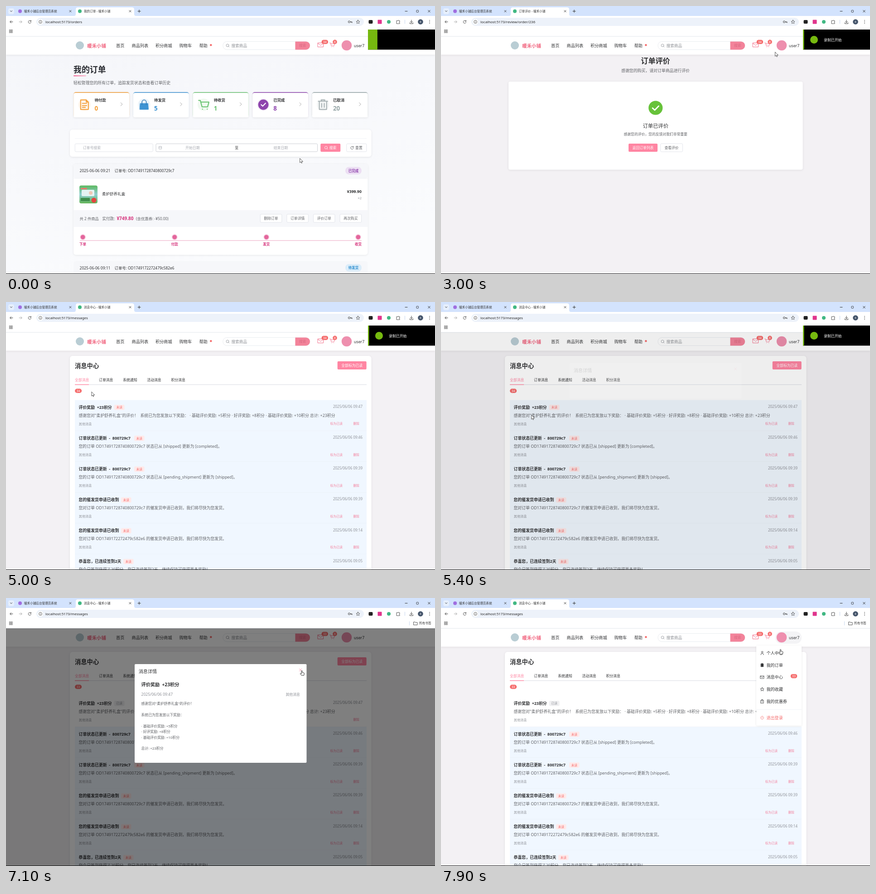
These frames come from a looping animation (947x592 px, 8000 ms). An HTML page:

```html
<!DOCTYPE html>
<html lang="zh-CN">
<meta charset="utf-8">
<style>
html, body { margin: 0; width: 100%; height: 100%; overflow: hidden; background: #f3f1f4 }
svg { display: block; width: 947px; height: 592px; font-family: "Noto Sans", "Noto Sans CJK SC", "Noto Sans CJK", sans-serif }
text { white-space: pre }
</style>
<svg id="stage" viewBox="0 0 947 592"></svg>
<script>
const PINK = '#ff85a2', RED = '#f56c6c', GREY = '#909399', INK = '#303133', LINE = '#dcdfe6';
const SHOP = '暖禾小铺', ITEM = '柔护舒养礼盒', ORDER = 'OD17491728740800729c7';

// y is the optical middle of the line of text
const text = (s, x, y, size, fill = INK, weight = 400, anchor = 'start', attr = '') =>
  `<text x="${x}" y="${y + size * .37}" font-size="${size}" fill="${fill}" font-weight="${weight}" text-anchor="${anchor}" ${attr}>${s}</text>`;
const mid = (s, x, y, size, fill, weight) => text(s, x, y, size, fill, weight, 'middle');
const end = (s, x, y, size, fill, weight) => text(s, x, y, size, fill, weight, 'end');
const rect = (x, y, w, h, fill, r = 0, attr = '') =>
  `<rect x="${x}" y="${y}" width="${w}" height="${h}" rx="${r}" fill="${fill}" ${attr}/>`;
const frame = (x, y, w, h, r = 2, color = LINE, fill = '#fff') => rect(x, y, w, h, fill, r, `stroke="${color}" stroke-width=".8"`);
const dot = (x, y, r, fill, attr = '') => `<circle cx="${x}" cy="${y}" r="${r}" fill="${fill}" ${attr}/>`;
const line = (d, color = '#444', w = 1, fill = 'none', attr = '') =>
  `<path d="${d}" stroke="${color}" stroke-width="${w}" fill="${fill}" stroke-linecap="round" stroke-linejoin="round" ${attr}/>`;
const at = (x, y, body, scale = 1) => `<g transform="translate(${x} ${y}) scale(${scale})">${body}</g>`;
const group = (id, body) => `<g id="${id}">${body}</g>`;
const lens = (x, y, color) => at(x, y, line('M3 0A3 3 0 1 1-3 0A3 3 0 1 1 3 0M2.2 2.2L3.8 3.8', color, .8));
const cross = (x, y, r, color, w) => at(x, y, line(`M${-r} ${-r}L${r} ${r}M${r} ${-r}L${-r} ${r}`, color, w));
const envelope = (x, y, color, w, scale) => at(x, y, line('M-6-4.5H6V4.5H-6ZM-6-3.5L0 1L6-3.5', color, w), scale);
const cart = (x, y, color, w, scale) =>
  at(x, y, line('M-6-5H-4L-2 2.5H4.5L6-3H-3.4M-1.5 5.2h.1M4 5.2h.1', color, w), scale);
const reload = (x, y, color) => at(x, y, line('M2.6-1.6A3.1 3.1 0 1 0 3.1.6M3-3.4V-1.3H.9', color, .9));
const button = (s, x, y, w, solid) =>
  (solid ? rect(x, y, w, 18, PINK, 2) : frame(x, y, w, 18)) + mid(s, x + w / 2, y + 9, 7.8, solid ? '#fff' : '#606266');
const badge = (x, y, w = 14.5) => rect(x - w / 2, y - 4.7, w, 9.4, RED, 4.7) + text('34', x, y, 6.8, '#fff', 400, 'middle', 'class="unreadCount"');

function chrome() {
  const tab = (x, color, s, id) => dot(x, 11.5, 4, color) + text(s, x + 9, 11.7, 6.6, '#333', 400, 'start', id);
  return rect(0, 0, 947, 22, '#d3e3fd') + rect(0, 22, 947, 45, '#fff') + rect(5, 5, 13, 13, '#e6effd', 4)
    + line('M9.5 10.5L11.5 12.5L13.5 10.5', '#333')
    + line('M150 22Q154 22 154 18V8Q154 3 159 3H278Q283 3 283 8V18Q283 22 287 22Z', 'none', 0, '#fff')
    + tab(31, '#a06ee0', SHOP + '后台管理员系统') + tab(163, '#41b883', '', 'id="tabTitle"')
    + cross(142, 11.5, 2, '#333', .9) + cross(274, 11.5, 2, '#333', .9)
    + line('M291 11.5H297M294 8.5V14.5M881 11.5H886', '#333') + frame(906, 9.3, 4.5, 4.5, 1, '#222', 'none') + cross(934, 11.5, 2.3, '#222', .9)
    + line('M15 35H9M11.5 32.2L8.8 35L11.5 37.8', '#444') + line('M29 35H35M32.5 32.2L35.2 35L32.5 37.8', '#aaa')
    + reload(52.3, 35, '#444') + rect(67, 26, 723, 18, '#edf2fa', 9)
    + dot(76, 35, 6, '#fff') + dot(76, 35, 3.4, 'none', 'stroke="#444" stroke-width=".8"') + line('M76 34.8V36.6M76 33.3v.1', '#444', .8)
    + text('', 87, 35, 7.95, '#222', 400, 'start', 'id="url"')
    + dot(757.5, 35, 2.1, 'none', 'stroke="#444"') + line('M760 35H764V37M762 35V36.5', '#444')
    + at(777, 35, line('M0-4L1.2-1.3L4-1L1.9.9L2.5 3.7L0 2.2L-2.5 3.7L-1.9.9L-4-1L-1.2-1.3Z', '#444', .8))
    + rect(800.5, 31, 9, 8, '#222', 2) + rect(820.5, 30.5, 9, 9, '#e0348c', 1) + dot(845, 35, 4, '#41b883')
    + line('M862.5 32.5H865Q866 29.5 867 32.5H869V35Q866.5 36 869 37V39H862.5Z', '#444', .9) + line('M880.5 31V39', '#c9d8ee')
    + line('M895 31V36.5M892.5 34.3L895 36.7L897.5 34.3M891.5 37V39H898.5V37', '#444')
    + dot(915, 35, 5.8, '#44546a') + mid('8', 915, 35, 6, '#fff') + [31.7, 35, 38.3].map(y => dot(935, y, .8, '#333')).join('')
    + [8, 12].map(x => [53, 57].map(y => frame(x - .5, y - .5, 2.7, 2.7, .4, '#444')).join('')).join('')
    + line('M890.5 52V60', '#c9d8ee') + line('M900 53H903L904 54H908V59.5H900Z', '#444', .9) + text('所有书签', 912, 56, 6.7, '#333')
    + rect(0, 66.6, 947, .8, '#dfe3ea');
}

function header() {
  const nav = [['首页', 243], ['商品列表', 277.6], ['积分商城', 330], ['购物车', 382.7], ['帮助', 426.7]];
  return rect(0, 67.4, 947, 40, '#fff', 0, 'filter="url(#soft)"') + dot(163, 87, 9, '#b9cdd4')
    + text(SHOP, 179.3, 88, 10.4, '#f1657f', 700) + nav.map(([s, x]) => text(s, x, 87.6, 9.15)).join('')
    + dot(452.3, 86.3, 2.2, RED) + frame(478.8, 78.4, 192, 18, 9, '#e4e7ed')
    + line('M638.5 78.4H662A9 9 0 0 1 662 96.4H638.5Z', 'none', 0, '#f3839a') + mid('搜索', 654.7, 87.6, 7.8, '#d96a82')
    + lens(489, 87, GREY) + text('搜索商品', 497.6, 87.6, 8.6, '#8d9095')
    + envelope(694.5, 86, '#f3718c', 1) + badge(703.8, 79.4) + cart(720, 86, '#f3718c', 1, .9)
    + dot(726, 79.4, 4.8, RED) + mid('8', 726, 79.4, 6.8, '#fff')
    + rect(738, 74, 58, 27, '#f4f4f6', 13, 'id="userHover"') + dot(752, 87, 11.2, '#ee8fae') + text('user7', 768, 87.6, 8.8);
}

function orders() {
  const icons = [
    line('M-9-11H4L9-6V11H-9ZM4-11V-6H9M-5-3H5M-5 2H5M-5 6H2', '#f39c33', 2),
    line('M-9-3H9L10 11H-10Z', '#3d93d3', 1, '#3d93d3') + line('M-5 0V-6A5 5 0 0 1 5-6V0', '#2f78b5', 1.6),
    cart(0, 0, '#67c26f', 1.1, 2),
    dot(0, 0, 12, '#8e44ad') + line('M-5 0L-1.5 3.5L5-3.5', '#fff', 2.2),
    line('M-11-8H11M-8.5-8V11H8.5V-8M-4-8V-11H4V-8M-3-3V6M3-3V6', '#a3adb0', 2)];
  const stats = [['待付款', 0, '#f39c33'], ['待发货', 5, '#3d93d3'], ['待收货', 1, '#67c26f'], ['已完成', 8, '#8e44ad'], ['已取消', 20, '#95a5a6']];
  const stat = ([label, n, color], i) => at(149.3 + i * 131.6, 190,
    rect(0, 0, 123, 56, color, 5, 'opacity=".75"') + rect(0, 2, 123, 54, '#fff', 4, 'filter="url(#soft)"')
    + dot(24, 28, 13.5, color, 'opacity=".1"') + at(24, 28, icons[i], .95)
    + text(label, 46.2, 17.6, 8.4, INK, 600) + text(n, 46.2, 36, 13.4, color, 700) + line('M104 23.5L107.5 27L104 30.5', '#999', .9));
  const head = (y, time, id, state, color, tint) => rect(149.3, y, 649, 32, '#f6f7fa', 5)
    + text(time, 162.6, y + 15, 8.45) + text('订单号: ' + id, 239.6, y + 15, 8.35)
    + rect(749, y + 6.5, 36, 16.5, tint, 8) + mid(state, 767, y + 15, 7.5, color, 700);
  const steps = ['下单', '付款', '发货', '收货'].map((s, i) => {
    const x = 169.6 + i * 202.6;
    return dot(x, 510.5, 6.5, '#f8cfe0') + dot(x, 510.5, 4.8, '#e3669c') + mid(s, x, 526.6, 7.5, '#d6337c', 700);
  }).join('');
  return rect(0, 107.4, 947, 485, 'url(#pageTint)') + text('我的订单', 149, 140, 17.9, '#2b2d33', 700) + rect(149, 153.3, 28, 2, 'url(#pinkFade)', 1)
    + text('轻松管理您的所有订单，追踪发货状态和查看订单历史', 148.7, 170, 8.95, '#606266') + stats.map(stat).join('')
    + rect(141, 273, 665.5, 60, '#fff', 6, 'filter="url(#soft)"') + rect(152, 292, 644, .7, '#ebeef5')
    + frame(152.3, 304.3, 172, 17.5) + text('订单号搜索', 169.7, 313, 7.9, '#a8abb2')
    + frame(331, 304.3, 356.5, 17.5, 2, '#c0c4cc') + frame(337.5, 310, 6, 6, .5, '#a8abb2') + line('M337.5 312.3H343.5', '#a8abb2', .7)
    + text('开始日期', 396, 313, 7.9, '#a8abb2') + text('至', 505.3, 313, 7.9) + text('结束日期', 590.7, 313, 7.9, '#a8abb2')
    + rect(694.3, 304, 44, 18, PINK, 2) + lens(706.5, 312.8, '#fff') + text('搜索', 713.7, 313, 7.9, '#fff')
    + frame(751.8, 304.3, 44, 17.5) + reload(764, 313.2, '#606266') + text('重置', 771, 313, 7.9, '#606266')
    + rect(149.3, 349, 649, 200.5, '#fff', 5, 'filter="url(#soft)"') + head(349, '2025-06-06 09:21', ORDER, '已完成', '#8e44ad', '#ecdff3')
    + rect(149.3, 380.5, 649, .7, '#eceef3')
    + rect(162, 396.5, 40, 39.5, 'url(#photo)', 4) + rect(167, 406, 28, 14, '#e4f3f2', 2) + rect(165, 402, 14, 3, '#e9776d', 1)
    + dot(187, 413, 4, '#efc7b4') + rect(165, 424, 20, 7, '#3f8d4b', 1) + dot(194, 429, 5.5, '#e3453f')
    + text(ITEM, 212, 414.6, 8.5) + end('¥399.90', 785, 409.6, 8.7, INK, 700) + end('×2', 785, 424, 7.5, GREY)
    + rect(149.3, 451, 649, 37, '#f6f7fa') + text('共 2 件商品', 162.6, 470, 8.3, '#606266') + text('实付款:', 212.4, 470, 8.6, '#606266')
    + text('¥749.80', 244.4, 469.7, 10, '#d6337c', 700) + text('(含优惠券: -¥50.00)', 287, 470, 8.4, '#606266')
    + ['删除订单', '订单详情', '评价订单', '再次购买'].map((s, i) => button(s, 561.3 + i * 58.6, 460, 47.5)).join('')
    + rect(163, 517.4, 622, 1.4, '#f2bfd3') + steps
    + head(563.5, '2025-06-06 09:11', 'OD1749172272479c582e6', '待发货', '#2f8fd0', '#dcedf9');
}

function review() {
  return mid('订单评价', 473.5, 120.7, 16.1, INK, 700) + mid('感谢您的购买，请对订单商品进行评价', 473.5, 143, 8.9, '#606266')
    + rect(149, 167, 649.5, 194.5, '#fff', 4, 'filter="url(#soft)"') + dot(473.7, 225, 15.6, '#67c23a') + line('M467 225.5L471.8 230L480.5 221', '#fff', 2.8)
    + mid('订单已评价', 473.7, 265, 11.3) + mid('感谢您的评价，您的反馈对我们非常重要', 473.7, 282.7, 7.8, '#606266')
    + button('返回订单列表', 414, 304, 64, true) + button('查看评价', 484.7, 304, 48.7);
}

function messages() {
  const rows = [
    ['评价奖励  +23积分', 241, `感谢您对"${ITEM}"的评价！  系统已为您发放以下奖励： · 基础评价奖励: +5积分 · 好评奖励: +8积分 · 基础评价奖励: +10积分 总计: +23积分`, '09:47'],
    ['订单状态已更新  -  800729c7', 285, `您的订单 ${ORDER} 状态已从 [shipped] 更新为 [completed]。`, '09:46'],
    ['订单状态已更新  -  800729c7', 285, `您的订单 ${ORDER} 状态已从 [pending_shipment] 更新为 [shipped]。`, '09:39'],
    ['您的催发货申请已收到', 256, `您对订单 ${ORDER} 的催发货申请已收到，我们将尽快为您发货。`, '09:39'],
    ['您的催发货申请已收到', 256, '您对订单 OD1749172272479c582e6 的催发货申请已收到，我们将尽快为您发货。', '09:14'],
    ['恭喜您，已连续签到2天', 261, '您今日签到获得了20积分，您已连续签到2天，继续保持可获得更多奖励！', '09:05']];
  const tag = (s, x, fill, color) => rect(x - 2, 10.5, 22.5, 11.5, fill, 2) + mid(s, x + 9.2, 16.3, 6.8, color);
  const row = ([title, x, body, time], i) => {
    const fresh = rect(152, 0, 644, 68.1, '#f0f7ff') + tag('未读', x, '#feeaea', RED) + text('标为已读', 715.8, 52.3, 6.8, '#f3809c');
    return at(0, 216.6 + i * 68.1, (i ? fresh : group('unreadRow', fresh) + group('readRow', tag('已读', x, '#f0f0f2', GREY)))
      + rect(152, 67.6, 644, .7, '#e8edf4') + text(title, 160.6, 16, 8.9, INK, 700) + text(body, 160.4, 34, 8.9, '#606266')
      + text('其他消息', 160.8, 52.3, 7.15, GREY) + text('删除', 766.5, 52.3, 6.8, '#f3809c') + end('2025/06/06 ' + time, 787, 14.6, 8, GREY));
  };
  return rect(141, 119, 665.5, 490, '#fff', 6, 'filter="url(#soft)"') + text('消息中心', 152, 141, 13.3, INK, 700) + button('全部标为已读', 731.7, 131, 64, true)
    + ['全部消息', '订单消息', '系统通知', '活动消息', '积分消息'].map((s, i) => text(s, 152 + i * 53.1, 172.3, 7.85, i ? INK : PINK)).join('')
    + rect(152, 182, 644, 1.1, '#dcdfe6') + rect(152, 181.8, 31, 1.4, PINK) + badge(159.6, 196.3, 15) + rows.map(row).join('');
}

function dialog() {
  const lines = [[233.5, `感谢您对"${ITEM}"的评价！`], [258, '系统已为您发放以下奖励：'], [283, '· 基础评价奖励: +5积分'],
    [295.5, '· 好评奖励: +8积分'], [308, '· 基础评价奖励: +10积分'], [332.5, '总计: +23积分']];
  return rect(284, 146, 379.5, 218, '#fff', 2, 'id="dialogBox"') + text('消息详情', 292.7, 162.4, 10.1) + cross(650, 159, 2.6, PINK, .8)
    + group('dialogBody', text('评价奖励  +23积分', 298.5, 191.6, 10.2, INK, 700) + text('2025/06/06 09:47', 298.5, 213, 8.55, GREY)
      + end('其他消息', 649, 213, 7.9, GREY) + lines.map(([y, s]) => text(s, 298.5, y, 7.85, '#606266')).join(''));
}

function menu() {
  const items = [[121.5, '个人中心', 'M-3 4Q-3 .5 0 .5T3 4M1.8-2A1.8 1.8 0 1 1-1.8-2A1.8 1.8 0 1 1 1.8-2'],
    [148.3, '我的订单', 'M-2.6-3H2.6V3.5H-2.6ZM-1-4H1'], [175, '消息中心'],
    [201.6, '我的收藏', 'M0-4L1.2-1.3L4-1L1.9.9L2.5 3.7L0 2.2L-2.5 3.7L-1.9.9L-4-1L-1.2-1.3Z'],
    [228.3, '我的优惠券', 'M-3-2H3V4H-3ZM-1.5-2V-4H1.5V-2M-1 1H1'], [264.4, '退出登录', 'M-2-2.6A3.3 3.3 0 1 0 2-2.6M0-4V0']];
  return rect(696, 105, 100, 176.5, '#fff', 3, 'filter="url(#soft)"') + rect(696, 246, 100, .7, '#ebeef5')
    + items.map(([y, s, d], i) => (d ? at(709, y, line(d, i == 5 ? RED : INK, .8, i == 1 ? INK : 'none')) : envelope(709, y, INK, 1.2, .65))
      + text(s, 718.5, y, 9.05, i == 5 ? RED : INK)).join('') + badge(779, 172.6);
}

stage.innerHTML = `<defs>
  <filter id="soft" x="-10%" y="-20%" width="120%" height="140%"><feDropShadow dx="0" dy="1" stdDeviation="2" flood-opacity=".09"/></filter>
  <linearGradient id="pageTint" x2=".4" y2="1"><stop stop-color="#f5f6fa"/><stop offset="1" stop-color="#fafbfd"/></linearGradient>
  <linearGradient id="pinkFade"><stop stop-color="#f0568c"/><stop offset="1" stop-color="#fbb4c9"/></linearGradient>
  <linearGradient id="photo" x2="0" y2="1"><stop stop-color="#5cb85f"/><stop offset=".5" stop-color="#8fcfd2"/><stop offset="1" stop-color="#62b457"/></linearGradient></defs>`
  + rect(0, 0, 947, 592, '#f3f1f4') + group('ordersPage', orders()) + group('reviewPage', review()) + group('messagesPage', messages())
  + header() + chrome() + group('userMenu', menu()) + rect(0, 67, 947, 525, '#000', 0, 'id="shade"') + group('dialogLayer', dialog())
  + group('notice', rect(799, 52, 148, 44.4, '#000') + rect(799, 52, 21, 44.4, '#76b90f', 0, 'id="noticeBar"')
    + group('noticeText', dot(823.5, 74.5, 8.5, '#76b90f') + text('录制已开始', 845, 74.6, 7.9, '#fff')))
  + group('status', rect(-4, 579.5, 91, 16, '#d3e3fd', 3) + text('localhost:5173/messages', 2.3, 586.6, 6.9, '#444'))
  + rect(0, 591, 947, 1, '#111')
  + group('arrow', line('M0 0V9L2.1 7.1L3.6 10.2L5 9.6L3.6 6.6H6.4Z', '#333', .8, '#fff'))
  + group('hand', line('M-1 1Q0-.6 1 1V4.5L4.2 5.2Q5.6 5.6 5.4 7L4.6 11H-.6L-3.6 7.2Q-3.6 5.6-1 7Z', '#222', .9, '#fff'));

const el = id => document.getElementById(id);
const ramp = (t, start, length) => Math.min(1, Math.max(0, (t - start) / length));
const ease = (t, start, length = 300) => 1 - (1 - ramp(t, start, length)) ** 2;
const fade = (id, a) => { el(id).setAttribute('opacity', a); el(id).style.display = a > 0 ? '' : 'none'; };
const move = (id, x, y) => el(id).setAttribute('transform', `translate(${x} ${y})`);
const put = (id, s) => { if (el(id).textContent != s) el(id).textContent = s; };
const within = (t, ...spans) => spans.some(([a, b]) => t >= a && t < b);

const path = [[0, 648.7, 337], [100, 648.7, 337], [850, 711.5, 468], [1300, 711.5, 468], [1800, 600, 341], [2200, 453, 260], [2700, 679.5, 122],
  [3000, 737.5, 102], [3250, 752, 90], [3650, 694, 88], [4500, 693, 89], [4900, 178, 146], [5100, 199.6, 250], [5450, 199.6, 250],
  [6200, 245, 294], [6800, 671, 166], [7050, 653, 160], [7300, 653, 160], [7600, 748, 92], [7900, 749.5, 113], [8000, 749.5, 113]];
const views = [[0, '我的订单', 'orders'], [1000, '订单评价', 'review/order/236'], [3920, '消息中心', 'messages']];

function draw(t) {
  const [, title, url] = views.findLast(v => t >= v[0]);
  put('tabTitle', `${title} - ${SHOP}`);
  put('url', 'localhost:5173/' + url);
  fade('ordersPage', 1 - ease(t, 1000));
  fade('reviewPage', ease(t, 1300) * (1 - ease(t, 3920)));
  fade('messagesPage', ease(t, 4230));

  const read = t >= 5500;
  fade('unreadRow', +!read);
  fade('readRow', +read);
  for (const n of document.querySelectorAll('.unreadCount')) n.textContent = read ? 33 : 34;

  const open = ease(t, 5380) * (1 - ease(t, 7300));
  fade('shade', open / 2);
  fade('dialogLayer', open);
  move('dialogLayer', 0, -13 * (1 - open));
  el('dialogBox').setAttribute('height', read ? 218 : 78);
  fade('dialogBody', +read);

  const menuShown = ease(t, 3180, 200) * (1 - ease(t, 3500, 200)) + ease(t, 7580, 250);
  fade('userMenu', menuShown);
  fade('userHover', menuShown);

  el('noticeBar').setAttribute('width', 21 - 18.5 * ease(t, 0, 250));
  fade('noticeText', ramp(t, 200, 200));
  move('notice', 148 * ramp(t, 5600, 300) ** 2, 0);
  fade('status', +within(t, [3700, 4600]));

  const i = path.findIndex(p => t < p[0]), [t0, x0, y0] = path[i - 1], [t1, x1, y1] = path[i];
  const p = ramp(t, t0, t1 - t0), s = p * p * (3 - 2 * p), x = x0 + (x1 - x0) * s, y = y0 + (y1 - y0) * s;
  const pointing = within(t, [780, 1350], [3080, 4540], [7000, 7350], [7540, 8000]);
  fade('hand', +pointing);
  fade('arrow', +!pointing);
  move('hand', x, y);
  move('arrow', x, y);
}

const start = performance.now();
(function tick() {
  draw((performance.now() - start) % 8000);
  requestAnimationFrame(tick);
})();
</script>
</html>
```
